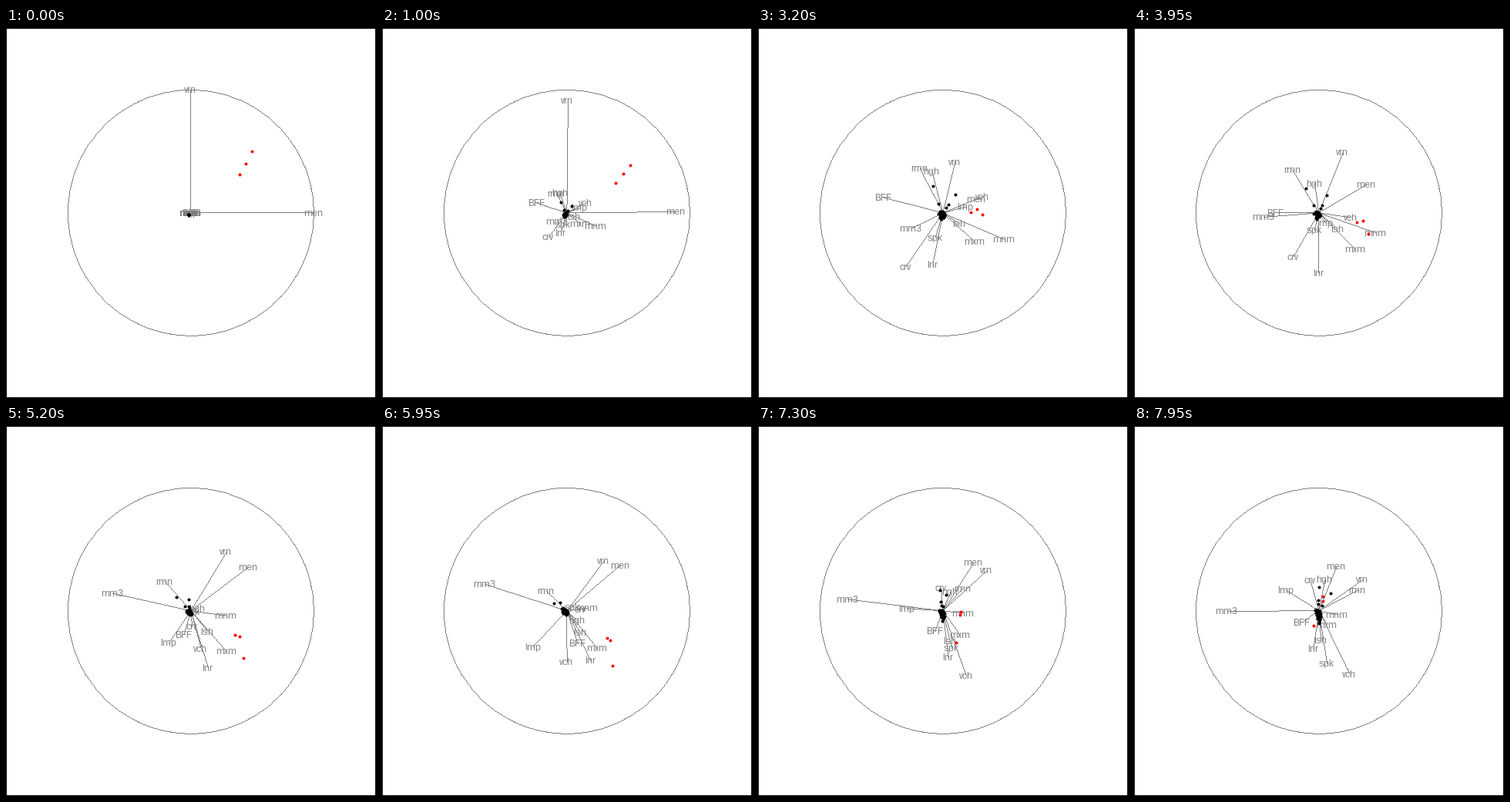
A matplotlib script for the animation above (8000 ms loop, 480x480 px).

```python
import numpy as np
import matplotlib.pyplot as plt
from matplotlib.animation import FuncAnimation

# Whole-pixel glyph shapes and advances
plt.rcParams.update({"text.hinting": "native", "text.hinting_factor": 1})

SIZE, MID, R = 480, 239.4, 159.6
FRAMES, INTERVAL = 160, 50
PX = 72 / 80  # points per pixel at 80 dpi
GREY = 127

# Where each axis points (pixels from the centre) at the three tour targets
AXES = {
    "men": (36 + 9j, 70 + 58j, 23 + 58j),
    "vrn": (9 + 60j, 46 + 65j, 58 + 41j),
    "rmn": (-28 + 58j, -30 + 25j, 51 + 27j),
    "hgh": (-18 + 59j, 14 - 15j, 8 + 41j),
    "BFF": (-85 + 28j, 16 - 43j, -22 - 15j),
    "mm3": (-28 - 26j, -102 + 36j, -120 + 0j),
    "spk": (-11 - 35j, 7 + 9j, 11 - 69j),
    "crv": (-53 - 74j, 19 + 0j, -11 + 40j),
    "lnr": (-18 - 62j, 32 - 64j, -7 - 50j),
    "lsh": (21 - 11j, 18 - 27j, 3 - 39j),
    "mxm": (39 - 33j, 40 - 49j, 11 - 18j),
    "mnm": (82 - 38j, 26 + 4j, 24 - 5j),
    "vch": (56 + 32j, -2 - 64j, 41 - 83j),
    "lmp": (38 + 16j, -42 - 50j, -43 + 27j),
}
NAMES = list(AXES)
DIM = len(NAMES)
REACHED = [0, 57, 116, 159]  # step at which each target is reached


def orthonormal(m):
    u, _, vt = np.linalg.svd(m, full_matrices=False)
    return u @ vt


def geodesic(a, b, s):
    """Frame a fraction s of the way from frame a to frame b."""
    u, c, vt = np.linalg.svd(a.T @ b)
    tau = np.arccos(np.clip(c, -1, 1))
    start = a @ u
    side = (b @ vt.T - start * np.cos(tau)) / np.sin(tau)
    spin = u @ vt
    th = s * np.arctan2(spin[1, 0], spin[0, 0])
    rot = np.array([[np.cos(th), -np.sin(th)], [np.sin(th), np.cos(th)]])
    return (start * np.cos(s * tau) + side * np.sin(s * tau)) @ u.T @ rot


targets = np.array(list(AXES.values()))
bases = [np.eye(DIM, 2)]
bases += [orthonormal(np.column_stack([t.real, t.imag])) for t in targets.T]


def basis(k):
    """Projection at step k; the tour rests one step after each target."""
    i = int(np.searchsorted(REACHED[1:3], k))
    begin = REACHED[i] + (i > 0)
    s = max(k - begin, 0) / (REACHED[i + 1] - begin)
    return geodesic(bases[i], bases[i + 1], s)


def observation(scale=R, **loadings):
    return scale * np.array([loadings.get(name, 0) for name in NAMES])


red = np.array([
    observation(men=.4, vrn=.31, lmp=.5, lnr=.6, lsh=.5, hgh=.3),
    observation(men=.45, vrn=.4, lmp=.65, lnr=.65, lsh=.55, hgh=.3),
    observation(men=.5, vrn=.495, lmp=.8, lnr=.9, lsh=1, hgh=.65,
                spk=.3, mm3=.2, vch=.15),
])
tall = observation(rmn=.45, hgh=.3, mm3=.1, mnm=.12)
wide = observation(hgh=.65, BFF=-.4, mm3=.1)
far = [tall, .35 * tall, wide, .45 * wide, .3 * wide]

# The rest huddle at the centre with a tail along one axis
rng = np.random.default_rng(4)
cluster = rng.normal(0, 1.8, (45, DIM))
cluster[:, NAMES.index("spk")] += 32 * rng.random(45) ** 2
black = np.vstack([far, cluster])
black[:, :2] = -2.2

fig = plt.figure(figsize=(6, 6), dpi=80, facecolor="white")
ax = fig.add_axes([0, 0, 1, 1])
ax.axis("off")


def draw_line(canvas, p, q):
    """One-pixel line without smoothing."""
    n = int(np.ceil(np.abs(np.subtract(q, p)).max())) + 1
    x, y = np.rint(np.linspace(p, q, n)).astype(int).T
    canvas[y, x] = GREY


def to_screen(p, centre):
    return centre + p * [1, -1]


backdrop = np.full((SIZE, SIZE), 255, np.uint8)
turn = np.linspace(0, 2 * np.pi, 50)
ring = to_screen(R * np.column_stack([np.cos(turn), np.sin(turn)]), MID)
for p, q in zip(ring, ring[1:]):
    draw_line(backdrop, p, q)
backdrop[[0, -1]] = 0
backdrop[:, [0, -1]] = 0

picture = ax.imshow(backdrop, cmap="gray", vmin=0, vmax=255,
                    interpolation="nearest", aspect="auto")
ax.set(xlim=(-0.5, SIZE - 0.5), ylim=(SIZE - 0.5, -0.5))

labels = [ax.text(MID, MID, name, color=str(GREY / 255), size=12 * PX,
                  family="Liberation Sans", ha="center", va="baseline")
          for name in NAMES]


def dots(color, z):
    return ax.plot([], [], "o", ms=4 * PX, mew=0, color=color,
                   antialiased=False, zorder=z)[0]


black_dots, red_dots = dots("black", 4), dots("red", 5)


def draw(k):
    b = basis(k)
    ends = to_screen(R * b, MID)
    canvas = backdrop.copy()
    for label, (x, y) in zip(labels, ends):
        draw_line(canvas, (MID, MID), (x, y))
        label.set_position((x - 1, y + 4))
    picture.set_data(canvas)
    black_dots.set_data(*to_screen(black @ b, 239).T)
    red_dots.set_data(*to_screen(red @ b, 239).T)
    return [picture, *labels, black_dots, red_dots]


anim = FuncAnimation(fig, draw, frames=FRAMES, interval=INTERVAL,
                     repeat=True, repeat_delay=0, blit=False)
plt.show()
```
